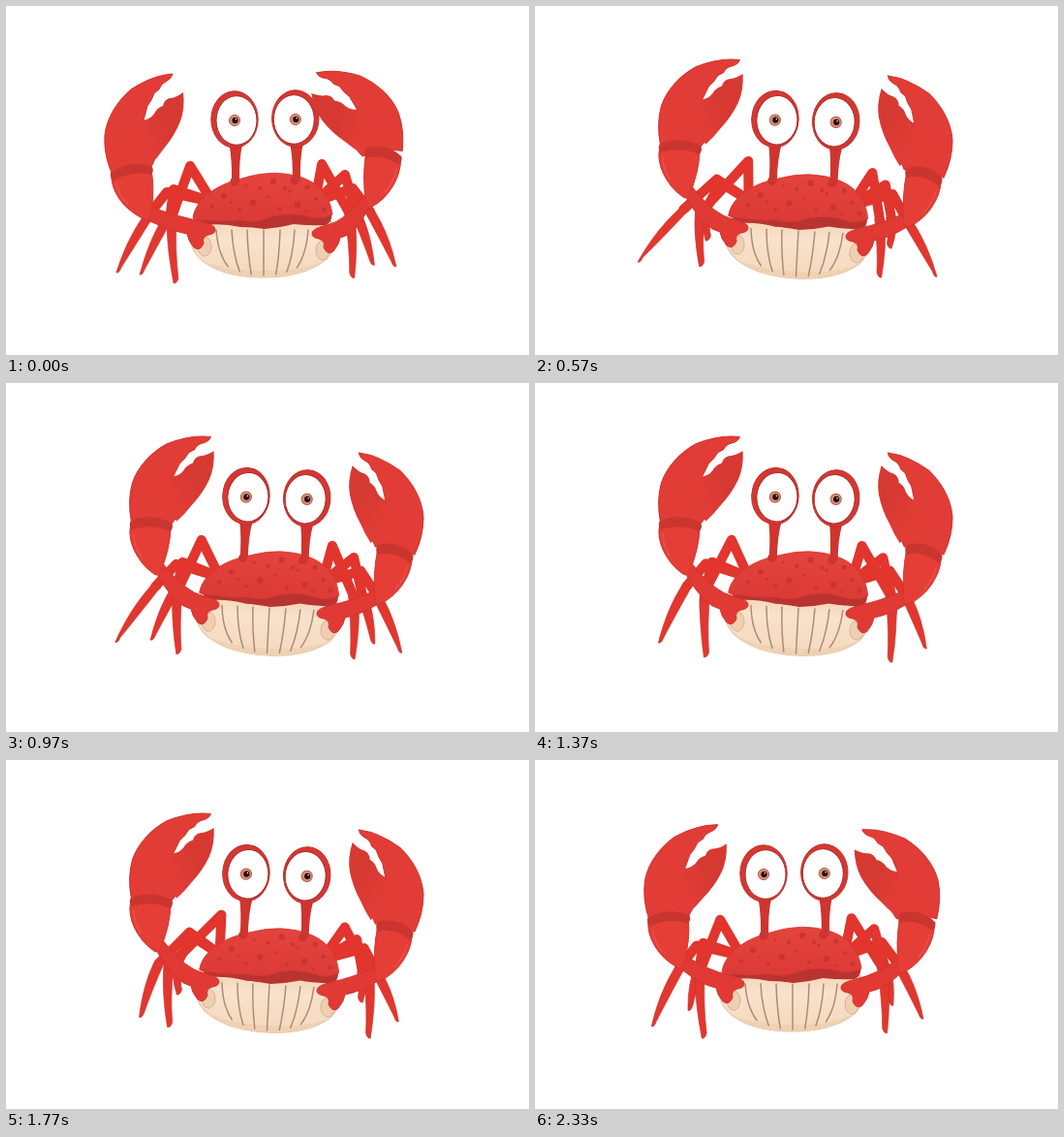
Recreate the animation shown at these times as an HTML page. Size 540 by 360 pixels, loop 2.36 s.

```html
<!DOCTYPE html>
<html lang="en">
<head>
<meta charset="utf-8">
<title>Dancing crab</title>
<style>
html, body { margin: 0; width: 100%; height: 100%; overflow: hidden; background: #fff; }
svg { display: block; width: 100vw; height: 100vh; }
</style>
</head>
<body>
<svg viewBox="0 0 540 360">
  <defs>
    <linearGradient id="cream" x1="0" y1="0" x2="0" y2="1">
      <stop offset="0" stop-color="#f3d6b9"/>
      <stop offset=".3" stop-color="#f8e2cb"/>
      <stop offset="1" stop-color="#f3d8bc"/>
    </linearGradient>
    <linearGradient id="dome" x1="0" y1="0" x2="0" y2="1">
      <stop offset="0" stop-color="#e5433d"/>
      <stop offset="1" stop-color="#dc3a36"/>
    </linearGradient>
    <linearGradient id="shade" gradientUnits="userSpaceOnUse" x1="10" y1="-40" x2="34" y2="-54">
      <stop offset="0" stop-color="#e23c36"/>
      <stop offset="1" stop-color="#d63932"/>
    </linearGradient>
    <g id="forearm">
      <path d="M-20,4 C-20,19 -8,38 14,48 Q19,50 20,45 C23,30 24,14 21,-3 Z" fill="#e53e37" stroke="#d3352f"/>
      <path d="M-15,12 Q-12,24 -3,33" fill="none" stroke="#ea5049" stroke-width="1.6" stroke-linecap="round"/>
      <path d="M-21,0 Q-8,-10 9,-9 Q18,-9 22,-6 Q24,-2 21,2 Q2,-3 -18,8 Q-22,5 -21,0 Z" fill="#cb352f"/>
    </g>
    <path id="palm" fill="#e23c36" stroke="#d0342e" d="M-20,0 C-24,-10 -28,-22 -27,-39 C-25,-57 -14,-74 0,-86 C14,-95 28,-101 43,-102 Q42,-97 36,-94 Q31,-92 29,-86 L24,-82 L21,-75 L17,-69 L13,-54 L28,-44 Q32,-26 21,-6 Q2,-10 -20,0 Z"/>
    <path id="finger" fill="url(#shade)" d="M12,-54 Q20,-55 24,-61 Q27,-67 33,-69 Q34,-75 40,-77 Q46,-77 54,-83 Q56,-66 51,-53 Q45,-38 34,-25 Q28,-16 20,-8 Q9,-25 12,-54 Z"/>
  </defs>
  <rect width="540" height="360" fill="#fff"/>
  <g id="legs" stroke-linejoin="round" stroke-linecap="round"></g>
  <g id="body">
    <path d="M196,222 C186,236 189,252 204,264 C222,277 245,280 266,280 C290,280 314,275 330,262 C342,250 342,236 336,222 Z" fill="url(#cream)" stroke="#dfbd9f"/>
    <path d="M204,264 C222,277 245,280 266,280 C290,280 314,275 330,262 C309,272 288,273 266,273 C244,273 224,271 204,264 Z" fill="#efd1b3"/>
    <g id="ribs" fill="none" stroke="#b08a76" stroke-width="1.5" stroke-linecap="round"></g>
    <path d="M195,216 Q197,225 206,226 Q224,224 242,228 Q256,228 267,230 Q282,229 297,225 Q316,227 330,226 Q338,223 336,212 Z" fill="#b93330"/>
    <path d="M193,219 C195,200 217,184 243,178 Q276,167 306,177 C326,184 335,199 337,215 Q328,220 318,219 Q306,215 293,215 Q276,216 268,220 Q255,224 242,221 Q222,223 206,221 Q198,222 193,219 Z" fill="url(#dome)" stroke="#d0372f" stroke-width=".8"/>
    <g id="dots" fill="#c93431"></g>
    <g id="eyes"></g>
  </g>
  <g id="front"></g>
</svg>
<script>
const $ = id => document.getElementById(id);
const LOOP = 2360, SWAY = 400, STRIDE = 472, RAD = Math.PI / 180;

function add(parent, tag, attrs = {}) {
  const el = document.createElementNS('http://www.w3.org/2000/svg', tag);
  set(el, attrs);
  parent.appendChild(el);
  return el;
}
function set(el, attrs) {
  for (const k in attrs) el.setAttribute(k, attrs[k]);
}
const clamp = v => Math.max(0, Math.min(1, v));
const off = (p, x, y) => `${(p[0] + x).toFixed(2)},${(p[1] + y).toFixed(2)} `;
function rotate([x, y], deg) {
  const c = Math.cos(deg * RAD), s = Math.sin(deg * RAD);
  return [x * c - y * s, x * s + y * c];
}

// Body details
for (const x of [217, 233, 249, 266, 283, 298, 312]) {
  const d = x - 266, end = 278 - d * d / 260;
  add($('ribs'), 'path', { d: `M${x},231 Q${x - d * .04},256 ${266 + d * .75},${end}` });
}
for (const [x, y, r] of [[255, 203, 3.2], [276, 181, 3], [288, 188, 2], [301, 205, 3.2], [293, 191, 1.6],
  [262, 188, 2], [225, 196, 3], [213, 207, 2], [283, 209, 2], [311, 187, 2.6], [320, 199, 2], [270, 197, 1.6],
  [248, 185, 1.6], [241, 210, 2], [328, 210, 2.4], [236, 181, 4.5], [298, 180, 4.5], [232, 203, 1.4], [310, 212, 1.4]])
  add($('dots'), 'circle', { cx: x, cy: y, r });

function eye(x, y, white) {
  const g = add($('eyes'), 'g', { transform: `translate(${x} ${y})` });
  add(g, 'path', { d: 'M-5.5,26 L8,26 Q4.5,42 5.2,64 Q1,67 -3,64 Q-2.5,42 -5.5,26 Z', fill: '#cf352f' });
  add(g, 'ellipse', { rx: 24.2, ry: 29.2, fill: '#d63731', stroke: '#bf312d' });
  add(g, 'ellipse', { cx: white, cy: 1, rx: 21, ry: 25.3, fill: '#fff', stroke: '#a92b2b' });
  add(g, 'circle', { cy: 1, r: 5.6, fill: '#dd8a75', stroke: '#b9604e' });
  add(g, 'circle', { cx: .5, cy: 1, r: 3.1, fill: '#1d1010' });
  add(g, 'circle', { cx: 1.4, cy: -.2, r: .8, fill: '#fff' });
}
eye(236, 117, 2);
eye(298.8, 116, -1.5);

// Legs: hip, knee, ankle and tip; the hind pair flicks out once per stride
const wave = (a, mid, amp, peak) => mid + amp * Math.cos((a - peak) * RAD);
const flick = a => wave(a, .5, .5, 200) ** 16;
const legs = [
  { m: -1, knee: c => [185 - 12 * c, 181 + 4 * c], ankle: () => [170, 213],
    tip: a => [172 - 34 * flick(a), 246 + 32 * flick(a)] },
  { m: -1, knee: c => [215 - 25 * c, 157 + 4 * c], ankle: t => [t[0] - 3, 218],
    tip: a => [wave(a, 164, 10, 195), wave(a, 275, 12, 170)] },
  { m: -1, knee: c => [182 - 16 * c, 176 + 12 * c], ankle: t => [133 + t[0] * .13, 215],
    tip: a => [wave(a, 119, 16, 90), wave(a, 271, 4, 190)] },
  { m: 1, knee: c => [354 - 4 * c, 176 - 6 * c], ankle: () => [361, 212],
    tip: a => [362 + 18 * flick(a), 244 + 24 * flick(a)] },
  { m: 1, knee: c => [342 - 16 * c, 164 - 5 * c], ankle: t => [t[0] - 4, 214],
    tip: a => [wave(a, 363, 10, 80), wave(a, 277, 5, 150)] },
  { m: 1, knee: c => [362 - 4 * c, 184], ankle: () => [376, 212],
    tip: a => [wave(a, 406, -7, 140), wave(a, 266, 5, 250)] }
].map(l => ({
  ...l,
  limb: add($('legs'), 'path', { fill: 'none', stroke: '#e1352d', 'stroke-width': 10 }),
  shin: add($('legs'), 'path', { fill: '#e1372f', stroke: '#cf302a', 'stroke-width': .6 })
}));

function drawLegs(a) {
  const c = Math.cos((a - 190) * RAD);
  for (const l of legs) {
    const { m } = l, hip = [m < 0 ? 213 : 319, 202], k = l.knee(c), t = l.tip(a), n = l.ankle(t);
    const mid = [n[0] * .5 + t[0] * .5, n[1] * .5 + t[1] * .5];
    set(l.limb, { d: 'M' + off(hip, 0, 0) + 'L' + off(k, 0, 4) + 'L' + off(n, 0, 0) });
    set(l.shin, { d: 'M' + off(n, -5 * m, 1) + 'Q' + off(n, 0, -6) + off(n, 5 * m, 0) + 'Q' + off(mid, 7 * m, -4) + off(t, m, 0) +
      'Q' + off(t, -2 * m, 1) + off(t, -4 * m, -5) + 'Q' + off(mid, -2 * m, 2) + off(n, -5 * m, 1) + 'Z' });
  }
}

// Arms: m is the side, left -1 and right 1
function makeArm(m) {
  const g = add($('front'), 'g');
  const cuff = add(g, 'ellipse', { rx: 7, ry: 10, fill: '#efcfb2', stroke: '#dbb096' });
  const upper = add(g, 'path', { fill: '#e13a34', stroke: '#d0342f', 'stroke-linejoin': 'round' });
  const hand = add(g, 'g');
  add(hand, 'use', { href: '#palm' });
  const finger = add(hand, 'use', { href: '#finger' });
  const fore = add(g, 'use', { href: '#forearm' });
  return { m, cuff, upper, fore, hand, finger };
}
const left = makeArm(-1), right = makeArm(1);

function drawArm(arm, wrist, shoulder, foreTurn, handTurn, [sx, sy], tilt) {
  const { m } = arm, s = shoulder;
  const at = `translate(${wrist[0]} ${wrist[1]}) rotate(`;
  set(arm.fore, { transform: `${at}${foreTurn}) scale(${-m * sx} ${sy})` });
  set(arm.hand, { transform: `${at}${handTurn}) scale(${-m} 1)` });
  set(arm.finger, { transform: `rotate(${-8 * tilt} 12 -50)` });
  const r = rotate([-m * 19 * sx, 42 * sy], foreTurn);
  const e = [wrist[0] + r[0], wrist[1] + r[1]];
  const p = (b, x, y) => off(b, -m * x, y);
  set(arm.cuff, { cx: s[0] + m * 4, cy: s[1] + 17 });
  set(arm.upper, { d: 'M' + p(e, 3, -6) + 'Q' + p(s, -28, -13) + p(s, -8, -9) + 'Q' + p(s, 8, -5) + p(s, 7, 0) +
    'Q' + p(s, 7, 4) + p(s, 0, 5) + 'Q' + p(s, -7, 7) + p(s, -5, 14) + 'Q' + p(s, -9, 23) + p(s, -15, 18) +
    'Q' + p(s, -21, 11) + p(s, -22, 4) + 'Q' + p(s, -38, 1) + p(e, -2, 7) + 'Z' });
}

function draw(t) {
  const p = t % SWAY, near = Math.min(p, SWAY - p);
  const u = clamp(near / 170);
  const tilt = clamp((near - 70) / 60);
  const turn = `rotate(${3 * tilt} 250 345)`;
  set($('body'), { transform: turn });
  set($('legs'), { transform: turn });
  drawLegs(t / STRIDE * 360 - 165 + 360);
  drawArm(left, [129 + 20 * u, 172 - 12 * u - 13 * u * u], [209 + 4 * tilt, 231 - 2 * tilt],
    12 * u, 11.5 * u, [1, 1], tilt);
  drawArm(right, [390 + 12 * u, 155 + 21 * u * (1.6 - .6 * u)], [323 + 5 * tilt, 235 + 3 * tilt],
    1 + 3 * u, -16 + 19 * u, [.88, 1.1], tilt);
}

// The picture advances 30 times a second
function frame() {
  const n = Math.floor((performance.now() % LOOP + 3.4) * .03);
  draw(Math.round(n / .3) * 10);
  requestAnimationFrame(frame);
}
frame();
</script>
</body>
</html>
```
